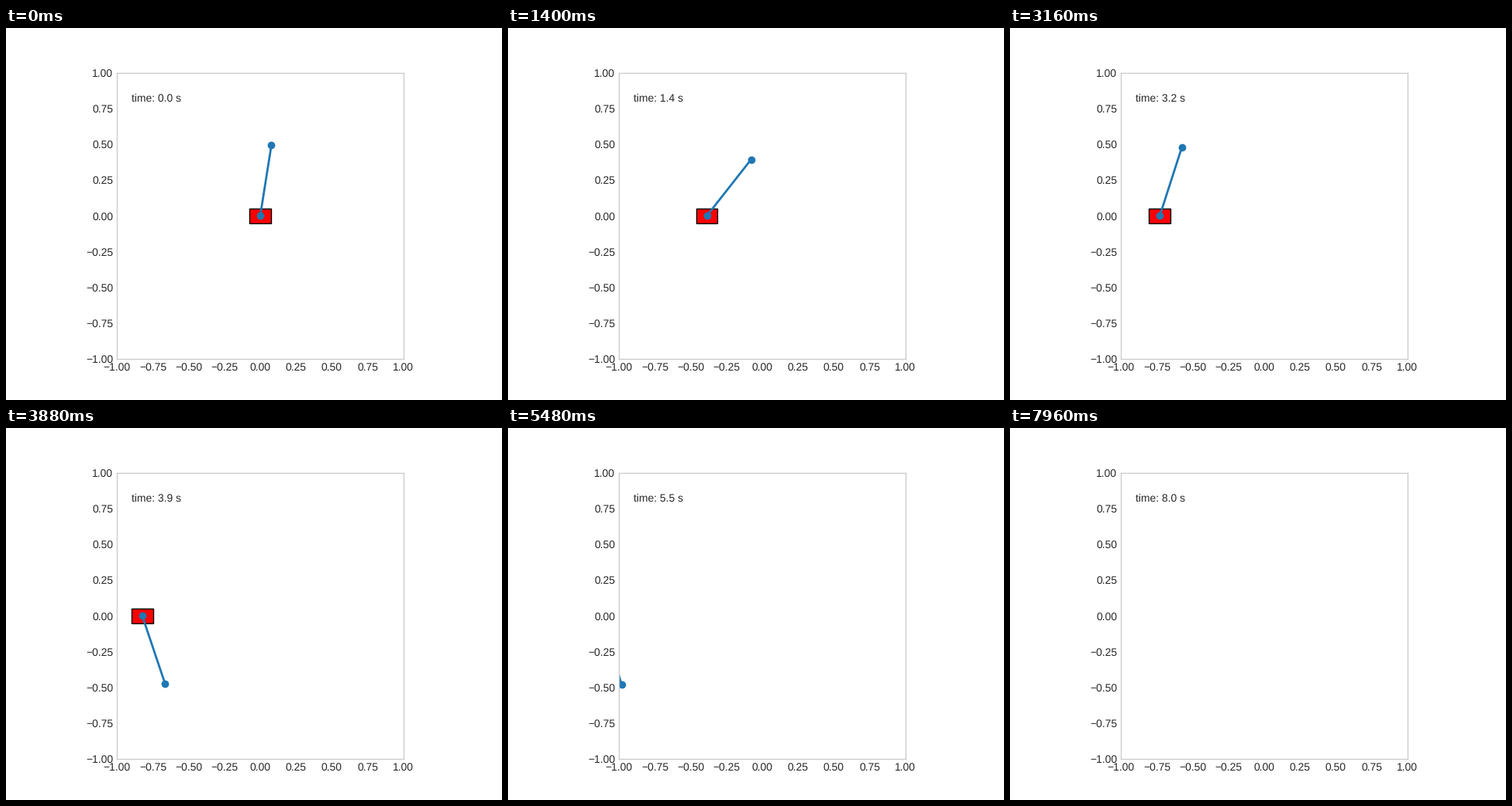
Write a matplotlib script that moves like this. It is 640 by 480 pixels and loops after 8 s.

```python
import numpy as np
import matplotlib.pyplot as plt
from matplotlib.animation import FuncAnimation
from matplotlib.patches import Rectangle

DT = 0.04            # seconds per frame
FRAMES = 200
SUB = 40             # integration steps per frame
ROD = 0.5
CART_W, CART_H = 0.15, 0.1
START = 0.45 * np.pi  # rod angle above the horizontal
PUSH, DRAG = 0.252, 0.078


def rod_angle(t):
    """Large-amplitude pendulum swing that slowly shrinks and sags."""
    phase = 2 * np.pi * t * (0.613 + 0.002 * t)
    k = np.sin(START / 2)
    wave = 2 * np.arcsin(k * (1.0341 * np.cos(phase) - 0.0341 * np.cos(3 * phase)))
    size = START - 0.0038 * t**2
    return wave / START * size - 0.023 * t


def cart_path():
    """Cart speed follows the rod's height, with drag."""
    h = DT / SUB
    s = np.sin(rod_angle(np.arange(FRAMES * SUB) * h + h / 2))
    path, x = [], 0.0
    for i, si in enumerate(s):
        if i % SUB == 0:
            path.append(x)
        x += h * (PUSH * (si - np.sin(START)) - DRAG * x)
    return np.array(path)


times = np.arange(FRAMES) * DT
angle = rod_angle(times)
cart_x = cart_path()
tip_x = cart_x + ROD * np.cos(angle)
tip_y = ROD * np.sin(angle)

plt.rcParams.update({
    "font.family": "Liberation Sans",
    "font.size": 10,
    "text.hinting": "none",
    "text.color": "0.15",
    "xtick.labelcolor": "0.15",
    "ytick.labelcolor": "0.15",
    "axes.edgecolor": "0.8",
    "axes.linewidth": 1.0,
    "xtick.major.size": 0,
    "ytick.major.size": 0,
})

fig = plt.figure(figsize=(6.4, 4.8), dpi=100)
ax = fig.add_axes([0.125, 0.11, 0.775, 0.77])
ax.set_aspect("equal")
ax.set(xlim=(-1, 1), ylim=(-1, 1))
ticks = np.linspace(-1, 1, 9)
ax.set_xticks(ticks)
ax.set_yticks(ticks)
ax.xaxis.set_major_formatter("{x:.2f}")
ax.yaxis.set_major_formatter("{x:.2f}")

cart = ax.add_patch(Rectangle((0, -CART_H / 2), CART_W, CART_H,
                              facecolor="red", edgecolor="black", linewidth=1))
rod, = ax.plot([], [], "o-", lw=2, ms=6, color="#1f77b4")
clock = ax.text(0.05, 0.9, "", transform=ax.transAxes)


def update(i):
    cart.set_x(cart_x[i] - CART_W / 2)
    rod.set_data([cart_x[i], tip_x[i]], [0, tip_y[i]])
    clock.set_text(f"time: {times[i]:.1f} s")
    return cart, rod, clock


anim = FuncAnimation(fig, update, frames=FRAMES, interval=1000 * DT,
                     init_func=lambda: update(0), repeat=True,
                     repeat_delay=0, blit=False)
plt.show()
```
